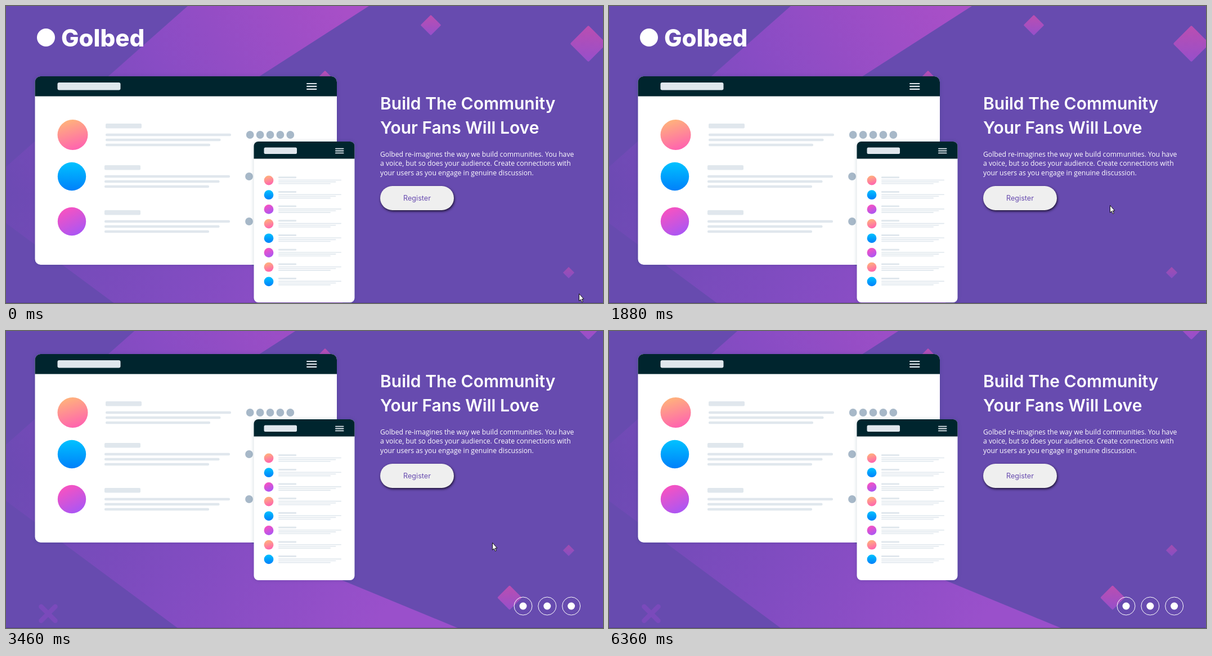
An HTML page that plays this animation: 1061 px wide and 528 px high, repeating every 6.82 s.

```html
<!DOCTYPE html>
<html lang="en">
<head>
<meta charset="utf-8">
<title>Community landing page</title>
<style>
  html, body { margin: 0; width: 100%; height: 100%; overflow: hidden; background: #674baf; }
  svg { display: block; width: 100%; height: 100%; }
  text { white-space: pre; }
  .head { font: 600 30px Inter, sans-serif; fill: #fff; }
  .body { font: 500 12.2px "Open Sans", sans-serif; fill: #fff; }
  .name { font: 800 42px Inter, sans-serif; fill: #fff; }
  .label { font: 400 12.6px Inter, sans-serif; text-anchor: middle; }
  .status { font: 400 9.8px "Open Sans", sans-serif; fill: #4c4c4c; }
  .raised { filter: drop-shadow(1px 2px 2.2px rgba(12, 6, 24, .85)); }
  .card { filter: drop-shadow(0 0 3px rgba(0, 50, 80, .2)); }
</style>
</head>
<body>
<svg id="stage" viewBox="0 0 1061 528" preserveAspectRatio="none"></svg>
<script>
const BRAND = 'Golbed', LOOP = 6820, TICK = 70, PALE = '#e0e7ed';
const WHITE = [255, 255, 255], PINK = [232, 130, 232], GREY = [239, 239, 239], PURPLE = [103, 75, 175];

// ---------- drawing helpers ----------
const repeat = (n, draw) => Array.from({ length: n }, (_, i) => draw(i)).join('');
const rect = (x, y, w, h, r, fill, extra = '') =>
  `<rect x="${x}" y="${y}" width="${w}" height="${h}" rx="${r}" fill="${fill}" ${extra}/>`;
const disc = (x, y, r, fill, extra = '') =>
  `<circle cx="${x}" cy="${y}" r="${r}" fill="${fill}" ${extra}/>`;
const text = (x, y, cls, str, extra = '') =>
  `<text x="${x}" y="${y}" class="${cls}" ${extra}>${str}</text>`;
const gradient = (id, [x1, y1, x2, y2], colors, units = 'objectBoundingBox') => {
  const stops = colors.map((c, i) => `<stop offset="${i / (colors.length - 1)}" stop-color="${c}"/>`).join('');
  return `<linearGradient id="${id}" gradientUnits="${units}" x1="${x1}" y1="${y1}" x2="${x2}" y2="${y2}">${stops}</linearGradient>`;
};
const diamond = (x, y, half, alpha = 1) => {
  const s = half * 1.44;
  return rect(-s / 2, -s / 2, s, s, s / 18, 'url(#gem)', `opacity="${alpha}" transform="translate(${x} ${y}) rotate(45)"`);
};
const menu = (x, y, w, gap, h) => repeat(3, i => rect(x, y + i * gap - h / 2, w, h, h / 2, PALE));
const panel = (x, y, w, h, r, bar) => `<g class="card">${rect(x, y, w, h, r, '#fff')}</g>
  <path d="M${x} ${y + bar}V${y + r}a${r} ${r} 0 0 1 ${r} ${-r}h${w - 2 * r}a${r} ${r} 0 0 1 ${r} ${r}v${bar - r}z" fill="#00252e"/>`;

const fills = ['url(#sun)', 'url(#sea)', 'url(#plum)'];

const wideRow = (x, y, i) => disc(i ? 117 : 118.5, y, i ? 25.2 : 27, fills[i])
  + rect(x, y - 20, 64, 8.6, 2, PALE)
  + repeat(3, k => rect(x, y - 2.3 + k * 9, 223 - k * 18.5, 4.5, 2, PALE));

const slimRow = i => {
  const y = 310 + 25.7 * i;
  return disc(467, y, 8.4, fills[i % 3])
    + rect(484, y - 6.8, 32, 3, 1, PALE)
    + repeat(3, k => rect(484, y - 1.3 + k * 3.1, 112 - k * 9.5, 1.6, .8, PALE));
};
const dot = (x, y) => disc(x, y, 6.9, '#a7b8c8');

const defs = `<defs>
  ${gradient('gem', [0, 0, 1, 1], ['#bb4eb0', '#964fcb'])}
  ${gradient('sun', [.3, 0, .6, 1], ['#ffb47a', '#ff62b0'])}
  ${gradient('sea', [.5, 0, .5, 1], ['#00c2ff', '#0080fa'])}
  ${gradient('plum', [.25, 0, .75, 1], ['#fb52be', '#a656f7'])}
  ${gradient('up', [0, 330, 600, 0], ['#6c4ab3', '#884cc4', '#a84fc7'], 'userSpaceOnUse')}
  ${gradient('down', [0, 330, 640, 650], ['#6c4ab3', '#814cc1', '#9a50cb'], 'userSpaceOnUse')}
</defs>`;

const backdrop = rect(0, 0, 1061, 620, 0, '#674baf')
  + '<path d="M0 286L323 0H645L127 333H0z" fill="url(#up)"/>'
  + '<path d="M0 333H127L803 612H305L0 386z" fill="url(#down)"/>'
  + diamond(755, 34, 18) + diamond(1035, 67, 32) + diamond(567, 128, 13)
  + diamond(1000, 474, 10, .7) + diamond(895, 558, 21.5)
  + '<path d="M62.5 574l25 25m0-25l-25 25" stroke="#7a4abb" stroke-width="8.5" stroke-linecap="round"/>';

const logo = disc(71, 56, 16, '#fff') + text(98, 71.5, 'name', BRAND);

const wide = panel(51.5, 125, 536.5, 335, 10, 35.5)
  + rect(91.5, 136, 112, 13.6, 3, PALE) + menu(534, 138, 18.5, 4.9, 2.2)
  + wideRow(177, 229, 0) + wideRow(175, 303, 1) + wideRow(175, 383, 2)
  + repeat(5, i => dot(433.7 + 17.9 * i, 229)) + dot(432, 303) + dot(432, 383);

const slim = panel(440.5, 241, 179, 286, 8, 30.5)
  + rect(458.5, 251.5, 58.5, 11.5, 2.5, PALE) + menu(585, 253.6, 15.5, 3.9, 1.8)
  + repeat(8, slimRow);

const copy = text(665, 184, 'head', 'Build The Community')
  + text(665, 227, 'head', 'Your Fans Will Love')
  + [`${BRAND} re-imagines the way we build communities. You have`,
     'a voice, but so does your audience. Create connections with',
     'your users as you engage in genuine discussion.']
    .map((s, i) => text(665, 268 + 16.3 * i, 'body', s)).join('')
  + `<g class="raised">${rect(665, 320, 131, 43, 21.5, '#efefef', 'id="button"')}</g>`
  + text(730.5, 346, 'label', 'Register', 'id="register"');

const LINK_Y = 573, linkX = i => 919 + 42.8 * i;
const social = repeat(3, i => `<g class="social">
  ${disc(linkX(i), LINK_Y, 16, 'none', 'stroke-width="1"')}${disc(linkX(i), LINK_Y, 6.5, '#fff')}</g>`);

const status = `<g id="status">
  <path d="M-1 529V511.5H74q3 0 3 3V529z" fill="#fff" stroke="#b9b9bd"/>
  ${text(3, 526.5, 'status', '192.0.2.7:8100')}</g>`;

const pointers = `<g id="cursor" stroke="#111" stroke-linejoin="round" fill="#fff">
  <path id="arrow" d="M.5 .5V13.4L3.3 10.7 5.3 15.4 7.3 14.5 5.3 10H9z"/>
  <path id="hand" d="M-1.5 1.5q1.7-2 3 0V7l5 1.2q2 .6 2 2.6v3.5L7 19H-1L-5 12q-.8-2 1-2l2.5 2z"/></g>`;

const stage = document.getElementById('stage');
stage.innerHTML = `${defs}<g id="page">${backdrop}${logo}${wide}${slim}${copy}${social}</g>
  ${rect(0, 527, 1061, 1, 0, '#2a1d50', 'opacity=".25"')}${status}${pointers}`;
const el = id => document.getElementById(id);
const icons = [...document.querySelectorAll('.social')];

// ---------- motion ----------
const clamp = v => Math.min(1, Math.max(0, v));
const smooth = p => p * p * (3 - 2 * p);
const smoother = p => p ** 3 * (10 - 15 * p + 6 * p * p);
const mix = (a, b, k) => `rgb(${a.map((v, i) => Math.round(v + (b[i] - v) * k))})`;

// one turn of the wheel: four held steps along an S-curve
const wheel = (t, start) => smoother(clamp((Math.floor((t - start) / TICK) + .036) / 4));
const scrollAt = t => Math.round(84 * (wheel(t, 590) - wheel(t, 1410) + wheel(t, 3180)));

// pointer glides: start, end, and the place reached
const glides = [
  [60, 140, 908, 326], [320, 590, 894, 351], [1130, 1200, 895, 354], [1820, 1880, 890, 354],
  [1880, 2500, 735, 343], [2830, 3250, 864, 359], [3250, 3540, 864, 380], [3540, 4190, 921, 484],
  [4280, 4530, 966, 484], [4810, 5150, 1004, 484], [5810, 6020, 1037, 457], [6020, 6360, 1020, 535]];

function pointerAt(t) {
  let x = 1018, y = 511;
  for (const [a, b, toX, toY] of glides) {
    const p = smooth(clamp((t - a) / (b - a)));
    x += (toX - x) * p;
    y += (toY - y) * p;
  }
  return [x, y];
}

function overButton(t) {
  const [x, y] = pointerAt(t), top = 320 - scrollAt(t);
  return x > 665 && x < 797 && y > top && y < top + 43;
}
const overLink = i => t => {
  const [x, y] = pointerAt(t);
  return Math.hypot(x - linkX(i), y + scrollAt(t) - LINK_Y) < 16.5;
};
const links = [0, 1, 2].map(overLink);

// share of the last `span` ms for which a test held
function recent(test, t, span) {
  const n = 32;
  let hits = 0;
  for (let i = 0; i < n; i++) hits += test(t - i * span / n);
  return hits / n;
}

function render(time) {
  const t = time % LOOP;
  const [x, y] = pointerAt(t).map(Math.round);
  el('page').setAttribute('transform', `translate(0 ${-scrollAt(t)})`);

  const k = recent(overButton, t, 320);
  el('button').setAttribute('fill', mix(GREY, PINK, k));
  el('register').setAttribute('fill', mix(PURPLE, WHITE, k));
  icons.forEach((g, i) => {
    const c = mix(WHITE, PINK, recent(links[i], t, 320));
    g.children[0].setAttribute('stroke', c);
    g.children[1].setAttribute('fill', c);
  });

  const onLink = u => links.some(test => test(u));
  const show = (id, on) => el(id).setAttribute('visibility', on ? 'visible' : 'hidden');
  const hand = overButton(t) || onLink(t);
  el('cursor').setAttribute('transform', `translate(${x} ${y})`);
  show('arrow', !hand);
  show('hand', hand);
  show('status', recent(onLink, t, 100) > 0);
}

const start = performance.now();
function loop() {
  render(performance.now() - start);
  requestAnimationFrame(loop);
}
loop();
</script>
</body>
</html>
```
